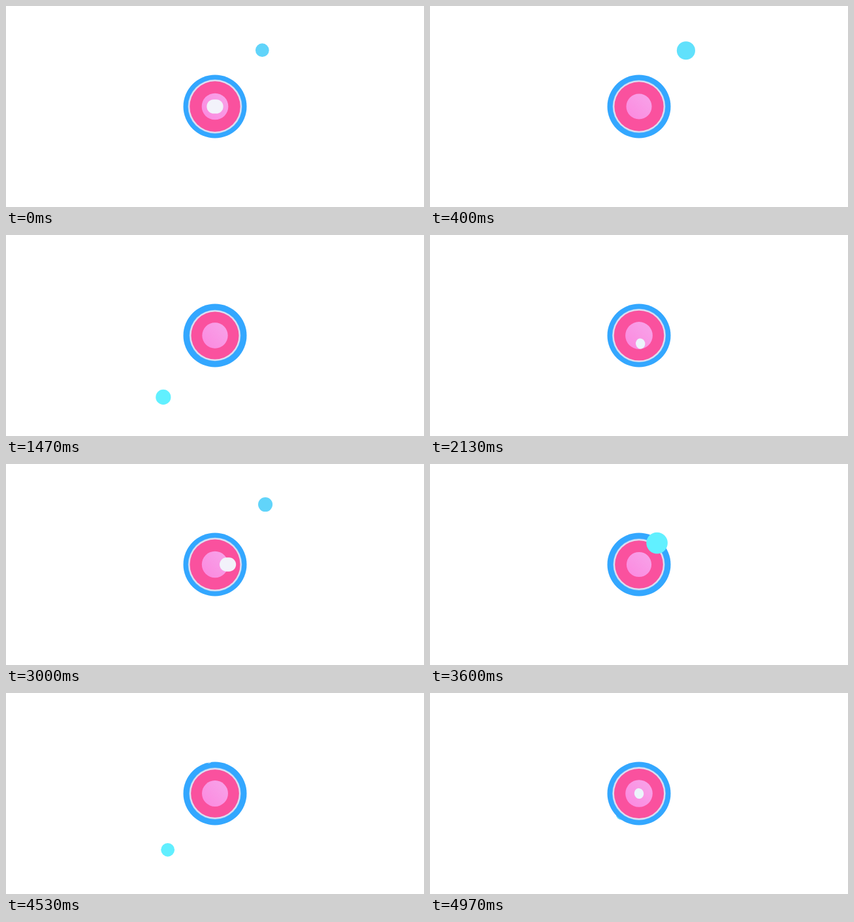
Write an HTML page with a canvas that moves like this. It is 640 px wide and 308 px high and loops after 5000 ms.

```html
<!DOCTYPE html>
<html lang="en">
<head>
<meta charset="utf-8">
<title>Orbiting spheres</title>
<style>
  html, body { margin: 0; width: 100%; height: 100%; overflow: hidden; background: #fff; }
  canvas { display: block; width: 640px; height: 308px; }
</style>
</head>
<body>
<canvas id="stage" width="640" height="308"></canvas>
<script>
const ctx = document.getElementById('stage').getContext('2d');
const LOOP = 5000;
const ORBIT = 2916;
const DEPTH = 0.28;
const CORE = 48.5;
const TAU = Math.PI * 2;

// front: time of the pass before the core; dx, dy: side reach of the orbit
const cyan = { front: 807, dx: -76.8, dy: 91.6 };
const across = { front: 0, dx: 79, dy: 0 };
const down = { front: 2054, dx: 10, dy: 55 };

const phase = (t, start) => TAU * (t - start) / ORBIT;
const clamp = v => Math.min(1, Math.max(0, v));

function place(orbit, t) {
  const a = phase(t, orbit.front);
  const k = 1 / (1 - DEPTH * Math.cos(a));
  const s = Math.sin(a) * k;
  return { a, k, x: orbit.dx * s, y: orbit.dy * s, near: Math.cos(a) > 0 };
}

function disc(x, y, r, fill) {
  ctx.beginPath();
  ctx.arc(x, y, r, 0, TAU);
  ctx.fillStyle = fill;
  ctx.fill();
}

const heart = ctx.createLinearGradient(-14, 14, 14, -14);
heart.addColorStop(0, '#fb8ce0');
heart.addColorStop(1, '#f8a0e8');

function drawCore(t) {
  const pink = 37.6 - 1.4 * Math.cos(phase(t, 1150));
  const inner = 20 - Math.cos(phase(t, 900));
  disc(0, 0, CORE, '#33a7ff');
  disc(0, 0, pink + 2.8, '#8cc4f8');
  disc(0, 0, pink + 2.2, '#dcdff2');
  disc(0, 0, pink, '#fa519e');
  disc(0, 0, inner, heart);
}

// The pale spheres only show against the core
function drawPale(t) {
  const h = place(across, t);
  const v = place(down, t);
  ctx.save();
  ctx.beginPath();
  ctx.arc(0, 0, CORE, 0, TAU);
  ctx.clip();
  if (h.near) {
    const r = 10.8 * (h.k / 1.389);
    ctx.beginPath();
    ctx.roundRect(h.x - r * 1.17, h.y - r, r * 2.34, r * 2, r);
    ctx.fillStyle = '#f2f2fa';
    ctx.fill();
  }
  if (v.near) {
    const r = 7.2 * (v.k / 1.389);
    ctx.beginPath();
    ctx.ellipse(v.x, v.y, r, r * 1.12, -0.18, 0, TAU);
    ctx.fillStyle = '#ebf4fb';
    ctx.fill();
  }
  ctx.restore();
}

function drawCyan(p) {
  const lit = clamp(0.5 + 0.9 * Math.cos(p.a - 0.733));
  const green = Math.round(212 + 28 * lit);
  const blue = Math.round(250 + 5 * lit);
  disc(p.x, p.y, 11 * p.k ** 1.25, `rgb(97,${green},${blue})`);
}

function draw(now) {
  const t = now % LOOP;
  const ball = place(cyan, t);
  ctx.setTransform(1, 0, 0, 1, 0, 0);
  ctx.fillStyle = '#fff';
  ctx.fillRect(0, 0, 640, 308);
  ctx.translate(320, 154);
  if (!ball.near) drawCyan(ball);
  drawCore(t);
  drawPale(t);
  if (ball.near) drawCyan(ball);
}

let start;
function tick(now) {
  start ??= now;
  draw(now - start);
  requestAnimationFrame(tick);
}
draw(0);
requestAnimationFrame(tick);
</script>
</body>
</html>
```
